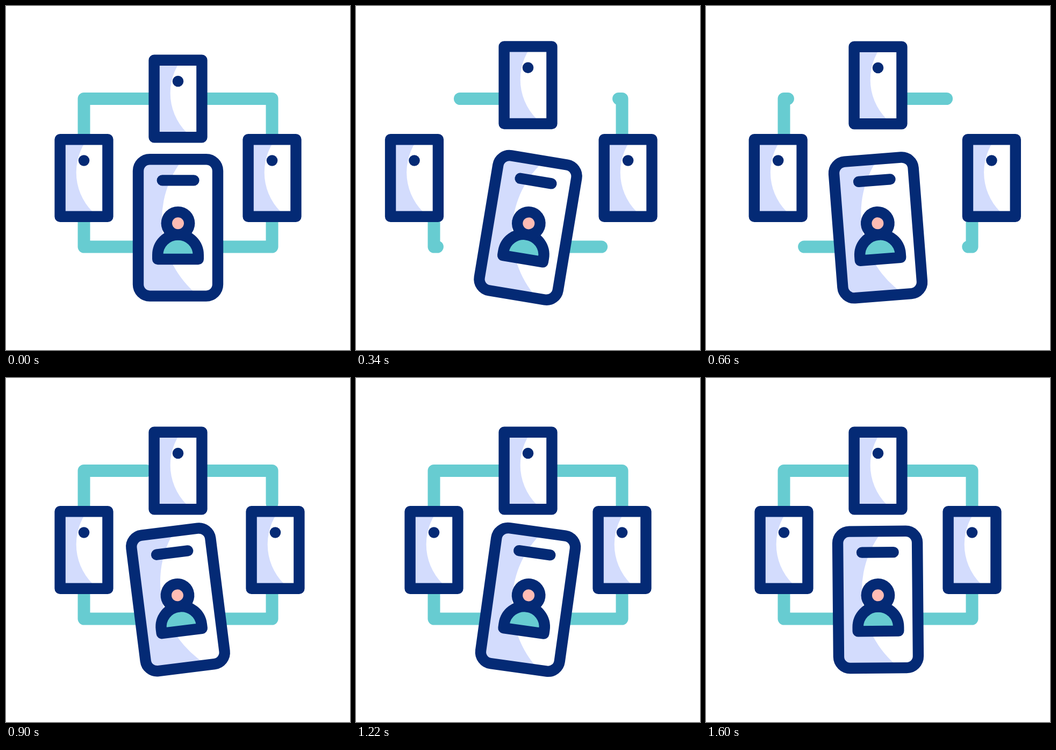
Write an HTML page with a canvas that moves like this. It is 640x640 px and loops after 1.62 s.

```html
<!DOCTYPE html>
<html lang="en">
<head>
<meta charset="utf-8">
<title>Device network</title>
<style>
  html, body { margin: 0; height: 100%; overflow: hidden; background: #fff; }
  canvas { display: block; width: 100vw; height: 100vh; }
</style>
</head>
<body>
<canvas id="stage" width="640" height="640"></canvas>
<script>
const ctx = document.getElementById('stage').getContext('2d');
const NAVY = '#042a75', TEAL = '#67ccd1', SHADE = '#d3dcfd', PINK = '#ffbcb4';
const LOOP = 1620, BEAT = 400;
const OUTLINE = 20.4, CABLE = 23, SHIFT = 38.8;

// Half sizes are measured to the middle of the outline.
const CENTER = 320, REACH = 175, TOP = 172.5, BOTTOM = 448;
const card = { halfW: 44.4, halfH: 71.8, radius: 0, light: { x: 89.7, y: -10.5, r: 104 } };
const phone = { y: 412.4, halfW: 74, halfH: 127.2, radius: 21.5, light: { x: 151, y: -15, r: 181 } };
const SWING = [0, 10, -10, 8, -0.5]; // degrees, one per beat

const smooth = p => p * p * (3 - 2 * p);
const ease = (t, start, length) => smooth(Math.min(1, Math.max(0, (t - start) / length)));

const swingAngle = t => SWING.slice(1).reduce(
  (angle, next, i) => angle + (next - SWING[i]) * ease(t, i * BEAT, BEAT), SWING[0]);

// Out for one beat, back for the next.
const nudge = (t, start) => SHIFT * (ease(t, start, BEAT) - ease(t, start + BEAT, BEAT));

function disc(x, y, r, color) {
  ctx.fillStyle = color;
  ctx.beginPath();
  ctx.arc(x, y, r, 0, Math.PI * 2);
  ctx.fill();
}

function stroke(color, width) {
  ctx.strokeStyle = color;
  ctx.lineWidth = width;
  ctx.stroke();
}

// Draws the part of a two-legged path between two fractions of its length.
function drawCable(start, corner, end, from, to) {
  if (to - from < 1e-4) return;
  const distance = (p, q) => Math.hypot(q.x - p.x, q.y - p.y);
  const mix = (p, q, k) => [p.x + (q.x - p.x) * k, p.y + (q.y - p.y) * k];
  const first = distance(start, corner), second = distance(corner, end);
  const a = from * (first + second), b = to * (first + second);
  const at = d => d < first ? mix(start, corner, d / first) : mix(corner, end, (d - first) / second);

  ctx.beginPath();
  ctx.moveTo(...at(a));
  if (a < first && b > first) ctx.lineTo(corner.x, corner.y);
  ctx.lineTo(...at(b));
  stroke(TEAL, CABLE);
}

// One cable per corner, each joining a side card to the top card or the phone.
function drawCables(t) {
  const retract = ease(t, 0, 1.5 * BEAT), extend = ease(t, BEAT, 1.5 * BEAT);
  for (const side of [-1, 1]) {
    for (const upper of [true, false]) {
      const y = upper ? TOP : BOTTOM;
      const corner = { x: CENTER + side * REACH, y };
      const atSide = { x: corner.x, y: CENTER + (upper ? -1 : 1) * card.halfH };
      const atMiddle = { x: CENTER + side * (upper ? card : phone).halfW, y };
      const fromSide = upper === (side < 0);
      const [start, end] = fromSide ? [atSide, atMiddle] : [atMiddle, atSide];
      drawCable(start, corner, end, retract, 1);
      drawCable(start, corner, end, 0, extend);
    }
  }
}

// White face in a frame, shaded on the left up to a large circle.
function drawFace({ halfW, halfH, radius, light }) {
  const frame = new Path2D();
  if (radius) frame.roundRect(-halfW, -halfH, 2 * halfW, 2 * halfH, radius);
  else frame.rect(-halfW, -halfH, 2 * halfW, 2 * halfH);
  ctx.fillStyle = SHADE;
  ctx.fill(frame);
  ctx.save();
  ctx.clip(frame);
  disc(light.x, light.y, light.r, '#fff');
  ctx.restore();
  ctx.strokeStyle = NAVY;
  ctx.lineWidth = OUTLINE;
  ctx.stroke(frame);
}

function drawCard(x, y) {
  ctx.save();
  ctx.translate(x, y);
  drawFace(card);
  disc(0, -32.5, 10.3, NAVY);
  ctx.restore();
}

function drawPerson() {
  const r = 37.8, shoulder = 50.9, base = 58.6, head = -8.1;
  ctx.beginPath();
  ctx.moveTo(-r, base);
  ctx.arc(0, shoulder, r, Math.PI, 0);
  ctx.lineTo(r, base);
  ctx.closePath();
  ctx.fillStyle = TEAL;
  ctx.fill();
  stroke(NAVY, OUTLINE);
  disc(0, head, 31.4, NAVY);
  disc(0, head, 11, PINK);
}

function drawPhone(degrees) {
  ctx.save();
  ctx.translate(CENTER, phone.y);
  ctx.rotate(degrees * Math.PI / 180);
  drawFace(phone);
  ctx.beginPath();
  ctx.moveTo(-29.2, -88);
  ctx.lineTo(29.4, -88);
  stroke(NAVY, OUTLINE);
  drawPerson();
  ctx.restore();
}

function draw(t) {
  ctx.fillStyle = '#fff';
  ctx.fillRect(0, 0, 640, 640);
  ctx.lineCap = ctx.lineJoin = 'round';
  drawCables(t);
  drawCard(CENTER - REACH - nudge(t, 0), CENTER);
  drawCard(CENTER, TOP - nudge(t, BEAT / 4));
  drawCard(CENTER + REACH + nudge(t, BEAT / 2), CENTER);
  drawPhone(swingAngle(t));
}

const begin = performance.now();
function tick() {
  draw((performance.now() - begin) % LOOP);
  requestAnimationFrame(tick);
}
tick();
</script>
</body>
</html>
```
